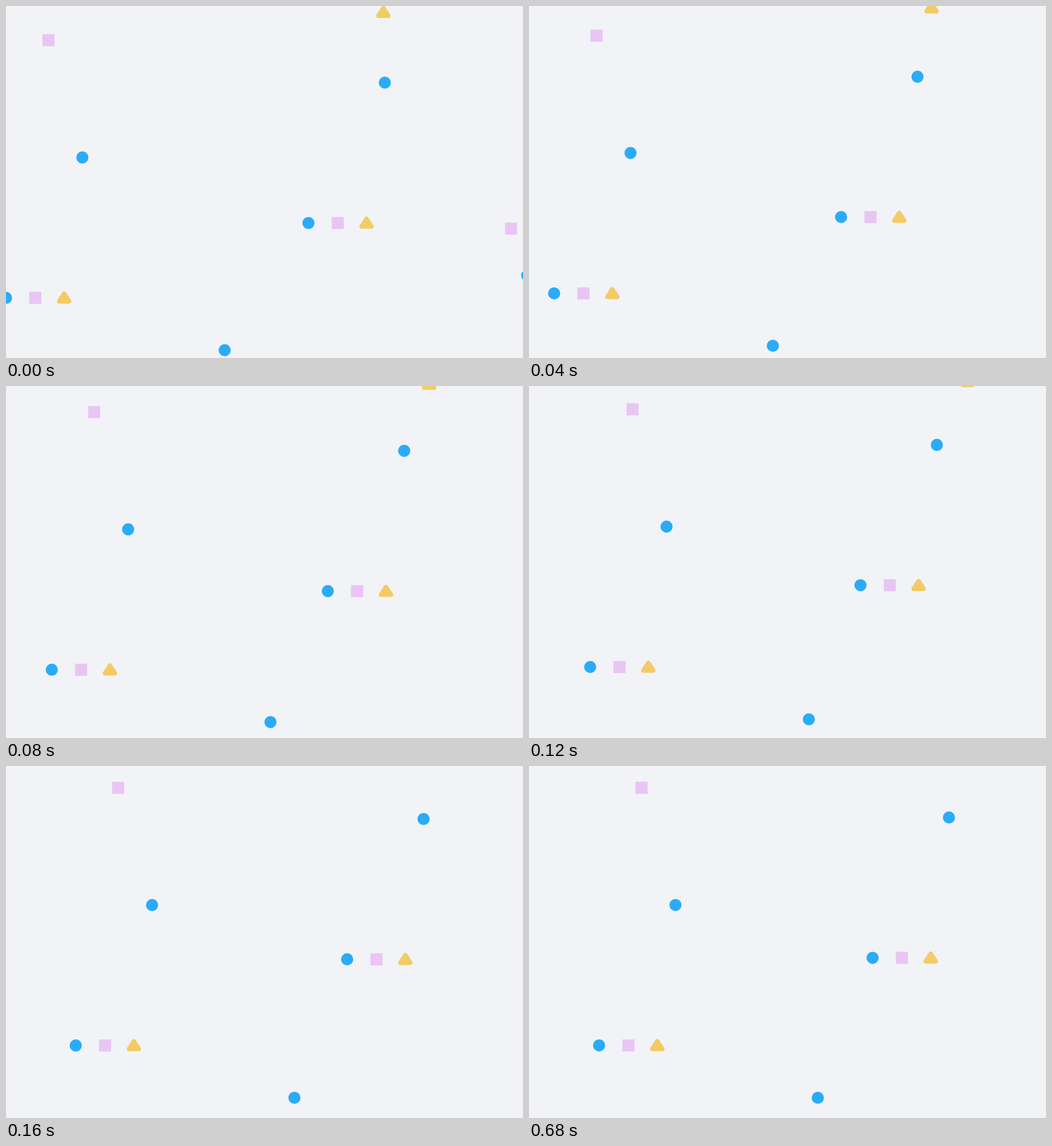
Recreate the animation shown at these times as an HTML page with a canvas. Size 907 by 618 pixels, loop 1000 ms.

```html
<!DOCTYPE html>
<html lang="en">
<head>
<meta charset="utf-8">
<title>Drifting shapes</title>
<style>
  html, body { margin: 0; width: 100%; height: 100%; overflow: hidden; background: #f1f3f7; }
  canvas { display: block; }
</style>
</head>
<body>
<canvas id="stage" width="907" height="618"></canvas>
<script>
const ctx = document.getElementById('stage').getContext('2d');
const LOOP = 1000, STEP = 40;

function circle(x, y) {
  ctx.fillStyle = '#2aabf8';
  ctx.beginPath();
  ctx.arc(x, y, 10.6, 0, Math.PI * 2);
  ctx.fill();
}

function square(x, y) {
  ctx.fillStyle = '#e9c5f4';
  ctx.fillRect(x - 10.6, y - 10.6, 21.2, 21.2);
}

function triangle(x, y) {
  ctx.fillStyle = ctx.strokeStyle = '#f3cb65';
  ctx.lineWidth = 8;
  ctx.lineJoin = 'round';
  ctx.beginPath();
  ctx.moveTo(x, y - 7.2);
  ctx.lineTo(x + 8.6, y + 6.1);
  ctx.lineTo(x - 8.6, y + 6.1);
  ctx.closePath();
  ctx.fill();
  ctx.stroke();
}

// Each group shares one move: distance, duration and easing.
const groups = [
  {
    dx: 123, dy: -21.8, time: 166.7,
    ease: u => 1 - Math.pow(1 - u, 1.62),
    shapes: [
      [circle, 0, 512.4], [square, 51.4, 512.4], [triangle, 102, 512.4],
      [circle, 134, 265.9], [circle, 383.7, 604.3], [circle, 914.4, 473],
      [square, 74.4, 60], [square, 886, 391], [triangle, 662, 11]
    ]
  },
  {
    dx: 72.2, dy: -44.2, time: 170,
    ease: u => u,
    shapes: [
      [circle, 664.6, 134.6], [circle, 530.6, 381],
      [square, 582, 381], [triangle, 632.6, 381]
    ]
  }
];

function draw(ms) {
  const t = Math.floor(ms / STEP) * STEP;
  ctx.fillStyle = '#f1f3f7';
  ctx.fillRect(0, 0, 907, 618);
  for (const g of groups) {
    const k = g.ease(Math.min(t / g.time, 1));
    for (const [shape, x, y] of g.shapes) shape(x + g.dx * k, y + g.dy * k);
  }
}

const start = performance.now();
function tick() {
  draw((performance.now() - start) % LOOP);
  requestAnimationFrame(tick);
}
tick();
</script>
</body>
</html>
```
